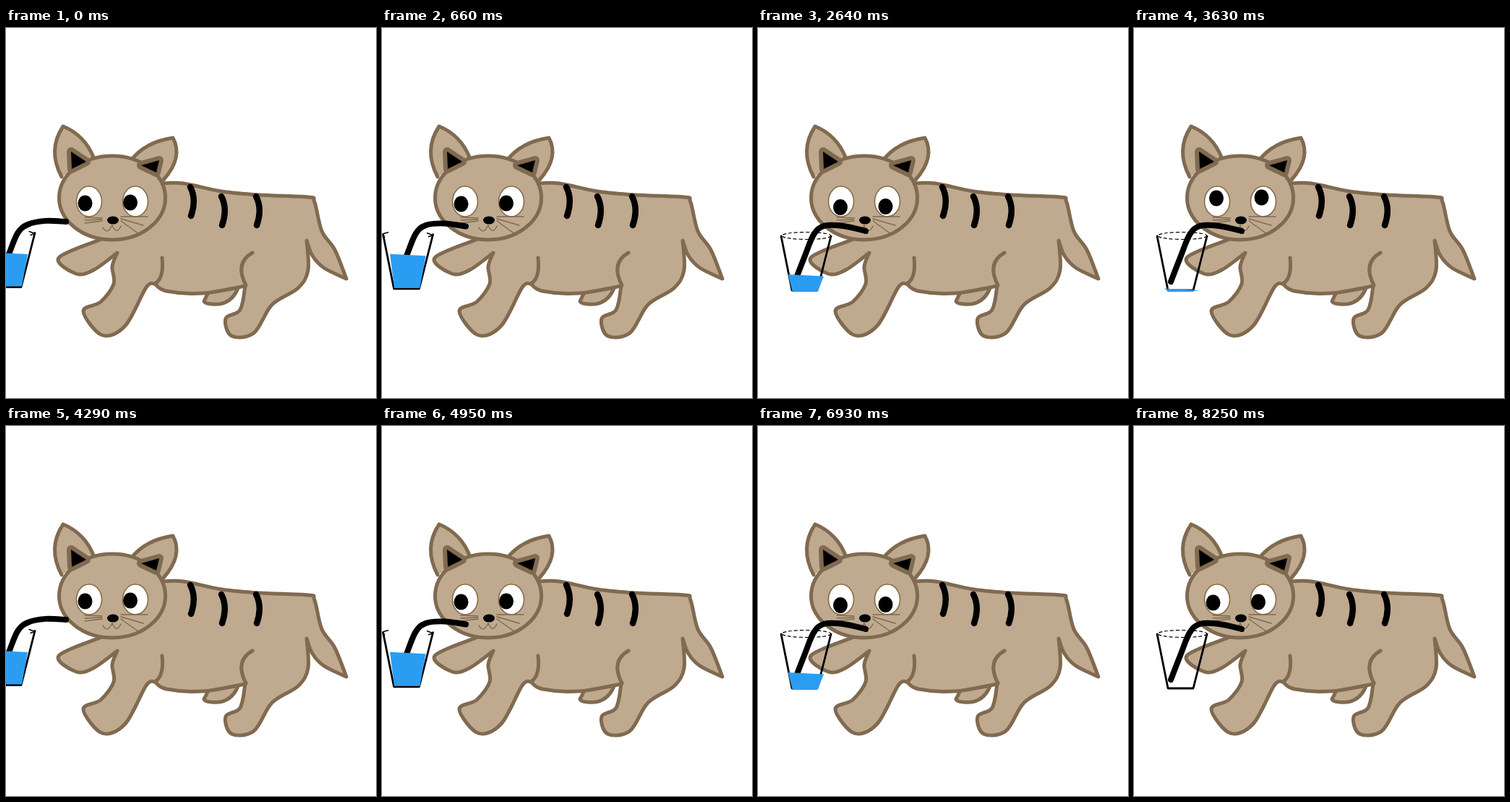
Animation, 512 px wide and 512 px high, one loop 8580 ms. Source, as an HTML page:

```html
<!DOCTYPE html>
<html lang="en">
<head>
<meta charset="utf-8">
<title>Thirsty cat</title>
<style>
html, body { margin: 0; width: 100%; height: 100%; overflow: hidden; background: #fff; }
svg { display: block; width: 100vw; height: 100vh; }
.fur { fill: #bfa98f; stroke: #806a50; stroke-width: 5; }
.fold { fill: none; stroke: #806a50; stroke-width: 5; }
.thin { fill: none; stroke: #806a50; stroke-width: 1.4; }
.inner { stroke: #806a50; stroke-width: 12; paint-order: stroke; }
.ink { fill: none; stroke: #000; }
.eye { fill: #fff; stroke: #8a6a48; stroke-width: 1.6; }
</style>
</head>
<body>
<svg id="stage" viewBox="0 0 512 512" stroke-linecap="round" stroke-linejoin="round"></svg>
<script>
const STEP = 330, CYCLE = 13, FULL = 4;
const stage = document.getElementById('stage');

function set(el, attrs) {
  for (const name in attrs) el.setAttribute(name, attrs[name]);
}
function add(tag, attrs, parent = stage) {
  const el = document.createElementNS('http://www.w3.org/2000/svg', tag);
  set(el, attrs);
  return parent.appendChild(el);
}
const draw = (cls, d, width, parent) =>
  add('path', { class: cls, d, ...(width && { 'stroke-width': width }) }, parent);
const oval = (cls, cx, cy, rx, ry, parent) => add('ellipse', { class: cls, cx, cy, rx, ry }, parent);
const clamp = v => Math.max(0, Math.min(1, v));

const points = text => text.split(' ').map(p => p.split(',').map(Number));

// Smooth curve through points.
function smooth(pts) {
  let d = '';
  for (let i = 0; i < pts.length - 1; i++) {
    const a = pts[i - 1] || pts[i], b = pts[i], c = pts[i + 1], e = pts[i + 2] || c;
    const c1 = b.map((v, j) => v + (c[j] - a[j]) / 6);
    const c2 = c.map((v, j) => v - (e[j] - b[j]) / 6);
    d += `C${c1} ${c2} ${c}`;
  }
  return 'M' + pts[0] + d;
}

// Smooth runs that meet at corners.
function outline(...runs) {
  let last;
  return runs.map(run => {
    const pts = points(run);
    if (last) pts.unshift(last);
    last = pts.at(-1);
    const d = smooth(pts);
    return d.slice(pts[0] === last || run === runs[0] ? 0 : d.indexOf('C'));
  }).join('');
}

// Two bulging sides from base to tip.
function ear([ax, ay], [tx, ty], [bx, by], side) {
  const inner = `${(ax + tx) / 2 - 9 * side} ${(ay + ty) / 2 - 10}`;
  const outer = `${(bx + tx) / 2 + 21 * side} ${(by + ty) / 2 - 2}`;
  draw('fur', `M${ax} ${ay}Q${inner} ${tx} ${ty}Q${outer} ${bx} ${by}`);
}

// Body
draw('fur', 'M279 368L274 378Q276 383 295 382Q316 379 323 354');
draw('fur', outline(
  '215,215 245,215 298,226 350,231 418,234 427,241 437,281 455,307 471,347',
  '440,332 424,315 416,294',
  '418,335 404,360 368,383 343,422 312,426 304,402 324,390 331,357',
  '273,367 222,364 206,354',
  '194,359 165,412 133,425 107,392 131,379 149,354 147,330 154,311',
  '121,335 97,340 73,318 130,293'));
draw('fold', 'M341 311Q316 325 332 356');
draw('fold', 'M216 318Q219 346 206 354');
for (const [x, y] of points('255,220 298,233 346,233')) draw('ink', `M${x} ${y}q9 17 1 40`, 8.5);

// Head
ear([122, 181], [79, 136], [77, 206], -1);
ear([173, 183], [231, 152], [218, 210], 1);
oval('fur', 147, 235, 73.5, 58);
draw('inner', 'M90 171L111 185L91 195Z');
draw('inner', 'M187 190L212 183L208 200Z');

const eyes = [115, 179].map(x => {
  oval('eye', x, 240, 17.5, 21);
  return oval('', x, 240, 10, 11);
});

for (let i = 0; i < 3; i++) {
  draw('thin', `M109 ${262 + 4 * i}L133 ${263 + 2 * i}`);
  draw('thin', `M159 ${261 + 3 * i}L${196 - 6 * i} ${261 + 12 * i}`);
}
draw('thin', 'M134 276Q140 287 147 273Q153 287 159 274', 2);
oval('', 148, 266, 8, 5.5);

// Drink
const straw = draw('ink', '', 8);
const glass = add('g', {});
draw('ink', 'M32 288L47 363H82L101 288', 2.8, glass);
const hooks = draw('ink', 'M34 292L32 287L39 285M93 286L101 289L95 291', 1.5, glass);
const rim = oval('ink', 67, 287.5, 34, 5, glass);
set(rim, { 'stroke-dasharray': '5 3', 'stroke-linecap': 'butt', 'stroke-width': 1.2 });
const water = add('path', { fill: '#2a9df3' }, glass);
const strawPts = points('149,281 118,274 91,274 77,286 65,315 51,351');

function render(time) {
  const k = Math.floor(time / STEP) % CYCLE;
  const away = 1 - clamp(k / FULL);
  const drunk = clamp((k - FULL) / 8);
  const sipped = drunk > 0;

  // The mouth end of the straw lifts while the glass is away.
  set(straw, { d: smooth(strawPts.map(([x, y]) => {
    const lift = clamp((x - 91) / 58);
    return [x - away * (61 + 5 * lift), y - away * (2 + 11 * lift)];
  })) });

  set(glass, { transform: `translate(${-61 * away} ${-4.5 * away})` });
  const top = 315 + 52 * drunk, low = sipped ? 364 : 362;
  set(water, { d: top < low ? `M41.5 ${top}L91 ${top + 2.5}L83 ${low}H47.5Z` : '' });
  set(hooks, { visibility: sipped ? 'hidden' : 'visible' });
  set(rim, { visibility: sipped ? 'visible' : 'hidden' });

  // Pupils roll once around as the glass runs dry.
  const a = clamp((k - 7) / 5) * 2 * Math.PI;
  const dx = -6.5 * Math.cos(a);
  const dy = (4 - 2 * away) * Math.cos(a) + 6.5 * Math.sin(a);
  eyes.forEach((eye, i) => set(eye, { cx: 116 + 62.5 * i + dx, cy: 240.5 - i + dy }));
}

let start;
function tick(now) {
  start ??= now;
  render(now - start);
  requestAnimationFrame(tick);
}
render(0);
requestAnimationFrame(tick);
</script>
</body>
</html>
```
